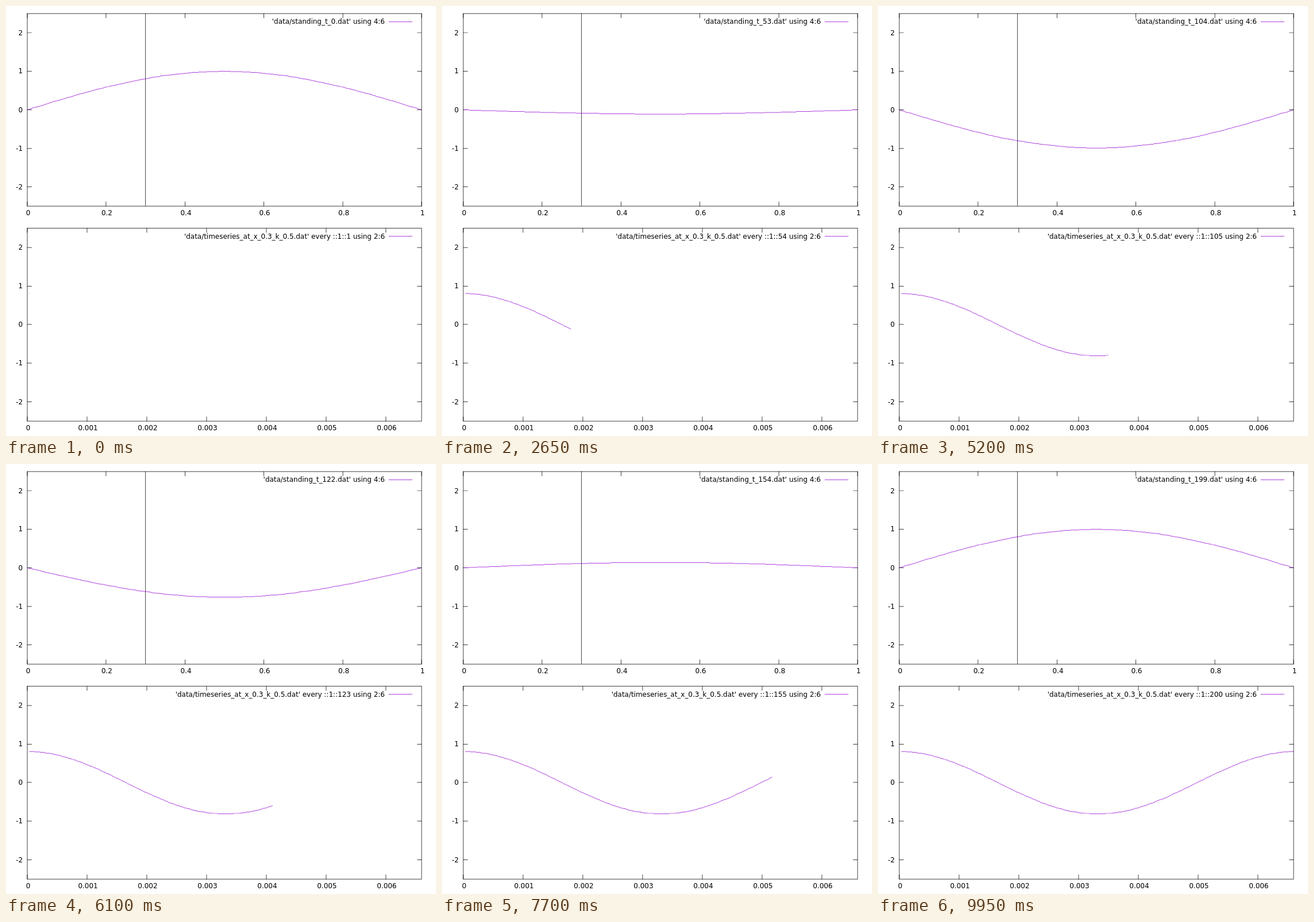
Animation of 748x748 px, one loop 10000 ms. Source, as an HTML page:

```html
<!DOCTYPE html>
<html lang="en">
<head>
<meta charset="utf-8">
<title>Standing wave</title>
<style>
  html, body { margin: 0; width: 100%; height: 100%; overflow: hidden; background: #fff; }
  svg { display: block; width: 748px; height: 748px; }
  text { font: 16px "DejaVu Sans", Verdana, sans-serif; fill: #000; white-space: pre; }
</style>
</head>
<body>
<!-- The plot is laid out on a 1000-unit grid and scaled to the stage. -->
<svg id="stage" viewBox="0 0 1000 1000"></svg>
<script>
const svg = document.getElementById('stage');
const LEFT = 49, RIGHT = 966, PURPLE = '#9400d3';
const STEP = 50, STEPS = 200, LAG = 0.45;
const AT_X = Math.sin(0.3 * Math.PI);

function add(tag, attrs, text) {
  const el = document.createElementNS('http://www.w3.org/2000/svg', tag);
  for (const k in attrs) el.setAttribute(k, attrs[k]);
  if (text !== undefined) el.textContent = text;
  svg.appendChild(el);
  return el;
}

const label = (x, y, anchor, text) => add('text', { x, y, 'text-anchor': anchor }, text);
const rect = (x, y, w, h) => `M${x} ${y}h${w}v${h}h${-w}z`;
const wave = n => Math.cos(2 * Math.PI * (n + LAG) / STEPS);

// One plot panel: frame, ticks, labels, key and an empty curve.
function panel(top, bottom, xMax, xTicks, marker) {
  const mapX = v => LEFT + Math.round(v / xMax * (RIGHT - LEFT));
  const mapY = v => bottom - Math.round((v + 2.5) * (bottom - top) / 5);
  let ticks = '';
  for (let v = -2; v <= 2; v++) {
    const y = mapY(v);
    ticks += rect(LEFT, y, 11, 1) + rect(RIGHT - 10, y, 11, 1);
    label(39, y + 6, 'end', v);
  }
  for (const v of xTicks) {
    const x = mapX(v);
    ticks += rect(x, top, 1, 11) + rect(x, bottom - 10, 1, 11);
    label(x + 2.5, bottom + 22, 'middle', v);
  }
  if (marker) ticks += rect(mapX(marker), top, 1, bottom - top);
  add('path', { d: ticks });
  add('path', { d: rect(890, top + 19, 55, 1), fill: PURPLE });
  const curve = add('path', { fill: PURPLE });
  const w = RIGHT - LEFT + 1, h = bottom - top + 1;
  add('path', { d: rect(LEFT, top, w, 1) + rect(LEFT, bottom, w, 1) +
                   rect(LEFT, top, 1, h) + rect(RIGHT, top, 1, h) });
  return { mapX, mapY, curve, key: label(881, top + 25, 'end', '') };
}

// Joins grid points with unsmoothed runs, one unit high.
function trace(points) {
  let [x0, y0] = points[0];
  let d = '', runX = x0, runY = y0, lastX = x0;
  for (const [x1, y1] of points.slice(1)) {
    for (let x = x0 + 1; x <= Math.min(x1, RIGHT); x++) {
      const y = Math.round(y0 + (y1 - y0) * (x - x0) / (x1 - x0));
      if (y !== runY) {
        d += rect(runX, runY, x - runX, 1);
        runX = x;
        runY = y;
      }
      lastX = x;
    }
    x0 = x1;
    y0 = y1;
  }
  return d + rect(runX, runY, lastX - runX + 1, 1);
}

const string = panel(17, 465, 1, [0, 0.2, 0.4, 0.6, 0.8, 1], 0.3);
const series = panel(516, 965, 0.0066, [0, 0.001, 0.002, 0.003, 0.004, 0.005, 0.006]);

function draw(n) {
  const amp = wave(n);
  const shape = [], past = [];
  for (let i = 0; i <= 100; i++) {
    shape.push([string.mapX(i / 100), string.mapY(amp * Math.sin(Math.PI * i / 100))]);
  }
  for (let r = 1; r <= n + 1; r++) {
    past.push([series.mapX(r / 30000), series.mapY(AT_X * wave(r))]);
  }
  string.curve.setAttribute('d', trace(shape));
  series.curve.setAttribute('d', trace(past));
  string.key.textContent = `'data/standing_t_${n}.dat' using 4:6`;
  series.key.textContent = `'data/timeseries_at_x_0.3_k_0.5.dat' every ::1::${n + 1} using 2:6`;
}

let start, shown = 0;
function tick(now) {
  if (start === undefined) start = now;
  const n = Math.floor((now - start) / STEP) % STEPS;
  if (n !== shown) draw(shown = n);
  requestAnimationFrame(tick);
}
draw(0);
requestAnimationFrame(tick);
</script>
</body>
</html>
```
